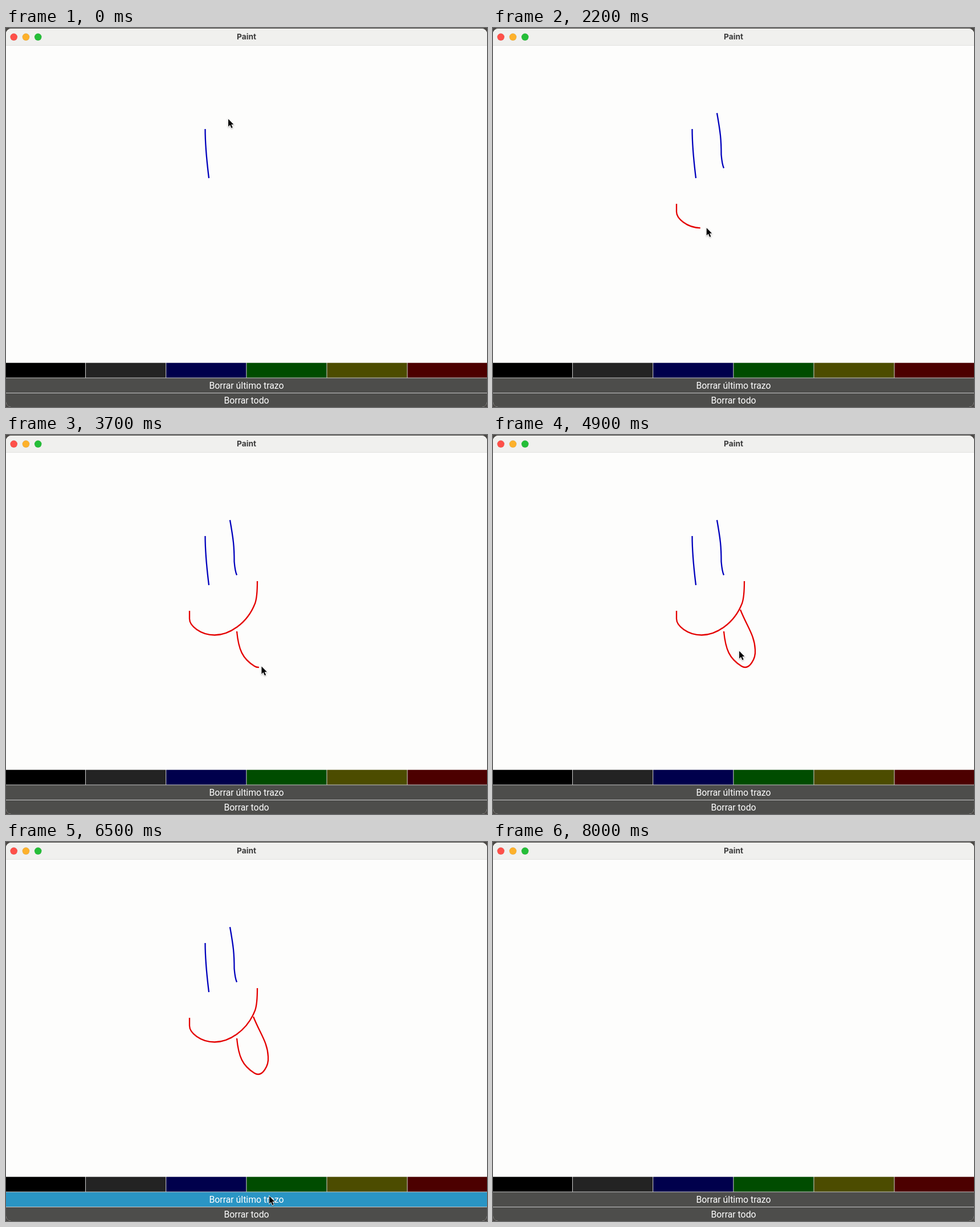
An HTML page that plays this animation: 844 px wide and 664 px high, repeating every 8200 ms.

```html
<!DOCTYPE html>
<html lang="es">
<head>
<meta charset="utf-8">
<title>Paint</title>
<style>
  html, body { margin: 0; width: 100%; height: 100%; overflow: hidden; background: #4a4744; }
  svg { display: block; }
  text { text-anchor: middle; }
  .title { font: 700 13.7px Inter, sans-serif; fill: #3b3b3b; }
  .label { font: 15.83px Roboto, sans-serif; fill: #fff; }
  .light { stroke: rgba(0, 0, 0, .12); stroke-width: .6; }
  .stroke { fill: none; stroke-width: 2.3; stroke-linejoin: round; }
  .row { fill: #4d4d4b; }
  #cursor { filter: drop-shadow(0 1px 1px rgba(0, 0, 0, .3)); }
</style>
</head>
<body>
<svg width="844" height="664" viewBox="0 0 844 664">
  <clipPath id="frame"><rect y="1" width="844" height="663" rx="9"/></clipPath>
  <g clip-path="url(#frame)">
    <rect width="844" height="664" fill="#fdfdfc"/>
    <rect width="844" height="30" fill="#f0f0ee"/>
    <rect y="30" width="844" height="1" fill="#e2e2e0"/>
    <g id="lights"></g>
    <text class="title" x="422" y="20.3">Paint</text>
    <g id="strokes"></g>
    <rect y="586.7" width="844" height="78" fill="#c8c8c8"/>
    <g id="swatches"></g>
    <rect id="undo" class="row" y="613.5" width="844" height="25.5"/>
    <rect id="clear" class="row" y="640" width="844" height="24"/>
    <text class="label" x="422" y="631.8">Borrar último trazo</text>
    <text class="label" x="422" y="658.2">Borrar todo</text>
    <path id="cursor" d="M.5 1V14.8L3.7 11.8 6.2 17.6 8.5 16.6 6 10.9H10.3Z"
      stroke="#fff" stroke-width="1.6" paint-order="stroke"/>
  </g>
</svg>
<script>
const LOOP = 8200, STEP = 100;
const BLUE = '#0000bc', RED = '#e40000', PRESSED = '#2a95c4';
const $ = id => document.getElementById(id);

function add(parent, tag, attrs) {
  const el = document.createElementNS('http://www.w3.org/2000/svg', tag);
  for (const name in attrs) el.setAttribute(name, attrs[name]);
  return parent.appendChild(el);
}

['#fe5049', '#fdb12b', '#24be38'].forEach((fill, i) =>
  add($('lights'), 'circle', { class: 'light', cx: 13.7 + i * 21.25, cy: 15.8, r: 6.2, fill }));

const PITCH = 141.15;
const swatches = ['#000', '#232323', '#00004c', '#004c00', '#4c4c00', '#4c0000'].map((fill, i) =>
  add($('swatches'), 'rect', { x: i * PITCH - 1.1, y: 586.7, width: PITCH - 1.05, height: 25.8, fill }));

// lead: how far the pointer runs ahead of the ink; ease: ease-out power
const strokes = [
  { from: -2, to: -1, gone: 7300, color: BLUE, lead: 0, ease: 1,
    d: 'M349.5 177C349.5 206 352.5 235 356 263' },
  { from: 100, to: 500, gone: 7300, color: BLUE, lead: 6, ease: 1,
    d: 'M393 149C399 183 400.5 195 400.5 222Q402 239 405 245.5' },
  { from: 1900, to: 2800, gone: 7300, color: RED, lead: 11, ease: 1,
    d: 'M322 308V322C322 334 341 350.5 366 350.5S423 331 437 295Q441 284 441 256' },
  { from: 3400, to: 4400, gone: 6600, color: RED, lead: 5, ease: 1.5,
    d: 'M405 344C408 376 415 392 436 405Q446 411 454 399 461 389 460 376C459 351 446 336 434 306' }
];
for (const s of strokes) {
  s.path = add($('strokes'), 'path', { d: s.d, class: 'stroke', stroke: s.color });
  s.size = s.path.getTotalLength();
}

const presses = [
  { el: swatches[5], from: 1100, to: 1300, x: 746, y: 594, fill: '#2b0000' },
  { el: $('undo'), from: 6400, to: 6600, x: 462, y: 620, fill: PRESSED },
  { el: $('clear'), from: 7200, to: 7300, x: 461, y: 646, fill: PRESSED }
];

// the pointer glides between stroke ends, pressed buttons and a few free stops
const stop = (t, { x, y }) => ({ t, x, y });
const stops = [
  stop(0, { x: 390, y: 159 }),
  stop(900, { x: 739.5, y: 571.5 }),
  stop(4900, { x: 432, y: 378 }),
  stop(6900, presses[2]),
  stop(7500, { x: 466, y: 690 }),
  ...presses.flatMap(p => [stop(p.from, p), stop(p.to, p)]),
  ...strokes.flatMap(s => [
    stop(s.from, s.path.getPointAtLength(0)),
    stop(s.to, s.path.getPointAtLength(s.size))
  ])
].sort((a, b) => a.t - b.t);

const clamp = v => Math.max(0, Math.min(1, v));
const smooth = p => p * p * (3 - 2 * p);

function inkLength(s, t) {
  const p = clamp((t - s.from) / (s.to - s.from));
  return s.size * (1 - (1 - p) ** s.ease);
}

function pointer(t) {
  const s = strokes.find(s => t > s.from && t < s.to);
  if (s) return s.path.getPointAtLength(Math.min(s.size, inkLength(s, t) + s.lead));
  const i = stops.findIndex(k => k.t > t);
  if (i < 0) return stops[stops.length - 1];
  const a = stops[i - 1], b = stops[i];
  const p = smooth((t - a.t) / (b.t - a.t));
  return { x: a.x + (b.x - a.x) * p, y: a.y + (b.y - a.y) * p };
}

function draw(now) {
  const t = Math.floor(now % LOOP / STEP) * STEP;
  for (const s of strokes) {
    const ink = inkLength(s, t);
    s.path.style.display = ink > 0 && t < s.gone ? '' : 'none';
    s.path.style.strokeDasharray = `${ink} 999`;
  }
  for (const p of presses) p.el.style.fill = t >= p.from && t < p.to ? p.fill : '';
  const { x, y } = pointer(t);
  $('cursor').setAttribute('transform', `translate(${x - .4} ${y - .4}) scale(.95)`);
}

const start = performance.now();
(function tick() {
  draw(performance.now() - start);
  requestAnimationFrame(tick);
})();
</script>
</body>
</html>
```
